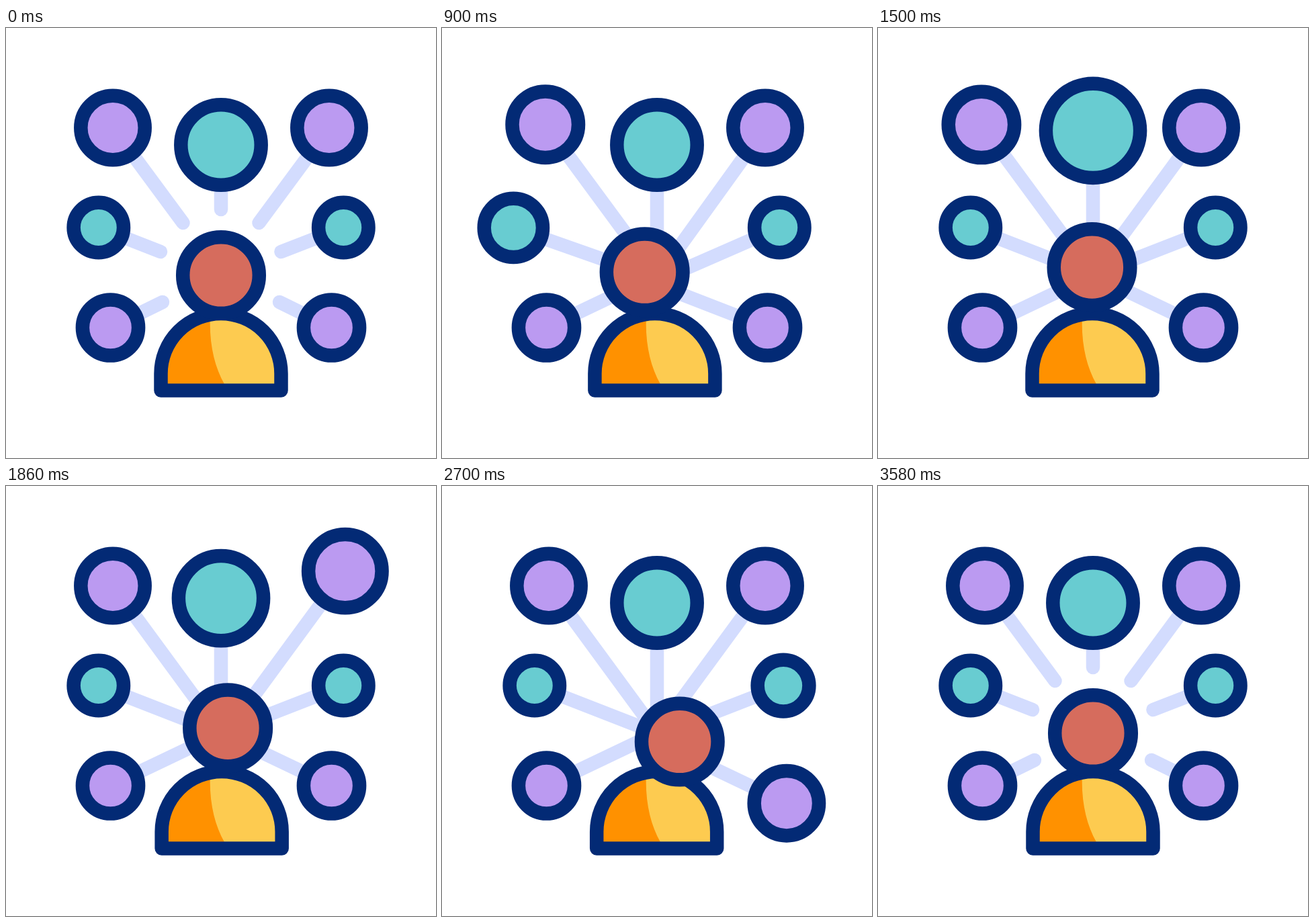
Recreate the animation shown at these times as an HTML page with a canvas. Size 640x640 px, loop 3600 ms.

```html
<!DOCTYPE html>
<html lang="en">
<head>
<meta charset="utf-8">
<style>
  html, body { margin: 0; width: 100%; height: 100%; overflow: hidden; background: #fff; }
  canvas { display: block; width: 640px; height: 640px; }
</style>
</head>
<body>
<canvas id="stage" width="640" height="640"></canvas>
<script>
const ctx = document.getElementById('stage').getContext('2d');
const LOOP = 3600, STEP = 400, STROKE = 20.5, LAST = 3180;
const NAVY = '#032a75', PURPLE = '#bb9af1', TEAL = '#68ccd1', PALE = '#d3dcfe';
const SKIN = '#d66c5d', ORANGE = '#ff9100', YELLOW = '#fdcb50';

// Nodes in pulse order; tip and reach are the short and long ends of the link,
// follow is how far the link end moves along with the node.
const nodes = [
  { x: 155.5, y: 446, r: 41.6, move: [-33.5, 31], grow: 7.8, color: PURPLE, tip: [233, 408], reach: [300, 377], follow: .4 },
  { x: 137.8, y: 297, r: 37.2, move: [-37.4, .5], grow: 7.65, color: TEAL, tip: [230, 333], reach: [320, 368], follow: .4 },
  { x: 159, y: 148.5, r: 47.7, move: [-33, -30.3], grow: 9.75, color: PURPLE, tip: [263.5, 290], reach: [320, 368], follow: .6 },
  { x: 320, y: 174, r: 59.7, move: [0, -25], grow: 12.3, color: TEAL, tip: [320, 270], reach: [320, 345], follow: 0 },
  { x: 481, y: 148.5, r: 47.7, move: [33, -30.3], grow: 9.75, color: PURPLE, tip: [376.5, 290], reach: [320, 368], follow: 1, lean: 1 },
  { x: 502.3, y: 297, r: 37.2, move: [37.4, .5], grow: 7.65, color: TEAL, tip: [409.5, 333], reach: [320, 368], follow: 1, lean: 1 },
  { x: 484.5, y: 446, r: 41.6, move: [33.5, 31], grow: 7.8, color: PURPLE, tip: [407, 408], reach: [340, 377], follow: 1, lean: 1 }
];

// Head x, head y, body shift at each step
const poses = [
  [320, 368, 0], [291, 379, -2], [300, 364.5, -3.5], [310.5, 357, -1], [320, 356, -1],
  [334, 362, 2], [347, 367, 11.8], [355, 383, -2.5], [320, 368, 0]
];

const lerp = (a, b, k) => a + (b - a) * k;
const ease = k => {
  k = Math.min(1, Math.max(0, k));
  return k * k * (3 - 2 * k);
};
const fall = (t, peak) => ease(1 - (t - peak) / (peak === 7 * STEP ? LAST - peak : STEP));
const pulse = (t, peak) => t < peak ? ease((t - peak + STEP) / STEP) : fall(t, peak);

function pose(t) {
  const i = Math.min(7, Math.floor(t / STEP));
  const k = i === 7 ? 1 - fall(t, 7 * STEP) : ease(t / STEP - i);
  return poses[i].map((v, j) => lerp(v, poses[i + 1][j], k));
}

function disc(x, y, r, color) {
  ctx.beginPath();
  ctx.arc(x, y, r, 0, Math.PI * 2);
  ctx.fillStyle = color;
  ctx.fill();
  ctx.strokeStyle = NAVY;
  ctx.stroke();
}

function drawLink(n, w, extend, lean) {
  const end = n.tip.map((v, j) => lerp(v, n.reach[j], extend) + n.move[j] * w * n.follow);
  if (n.lean) {
    end[0] -= 6 * lean;
    end[1] += 13 * lean;
  }
  ctx.strokeStyle = PALE;
  ctx.beginPath();
  ctx.moveTo(n.x + n.move[0] * w, n.y + n.move[1] * w);
  ctx.lineTo(end[0], end[1]);
  ctx.stroke();
}

function drawBody(shift) {
  const body = new Path2D();
  body.moveTo(230.5 + shift, 539.5);
  body.lineTo(230.5 + shift, 514.5);
  body.arc(320 + shift, 514.5, 89.5, Math.PI, 0);
  body.lineTo(409.5 + shift, 539.5);
  body.closePath();
  ctx.fillStyle = YELLOW;
  ctx.fill(body);
  ctx.save();
  ctx.clip(body);
  ctx.fillStyle = ORANGE;
  ctx.beginPath();
  ctx.moveTo(200, 420);
  ctx.lineTo(304.5, 420);
  ctx.bezierCurveTo(301, 464, 309, 502, 325, 530);
  ctx.lineTo(325, 545);
  ctx.lineTo(200, 545);
  ctx.fill();
  ctx.restore();
  ctx.strokeStyle = NAVY;
  ctx.stroke(body);
}

function draw(now) {
  const t = now % LOOP;
  ctx.fillStyle = '#fff';
  ctx.fillRect(0, 0, 640, 640);
  ctx.lineWidth = STROKE;
  ctx.lineCap = ctx.lineJoin = 'round';

  const weights = nodes.map((_, i) => pulse(t, (i + 1) * STEP));
  const extend = t < STEP ? ease(t / STEP) : fall(t, 7 * STEP);
  nodes.forEach((n, i) => drawLink(n, weights[i], extend, weights[1]));
  nodes.forEach((n, i) => {
    const w = weights[i];
    disc(n.x + n.move[0] * w, n.y + n.move[1] * w, n.r + n.grow * w, n.color);
  });

  const [x, y, shift] = pose(t);
  drawBody(shift);
  disc(x, y, 56.8, SKIN);
}

const start = performance.now();
function tick() {
  draw(performance.now() - start);
  requestAnimationFrame(tick);
}
tick();
</script>
</body>
</html>
```
